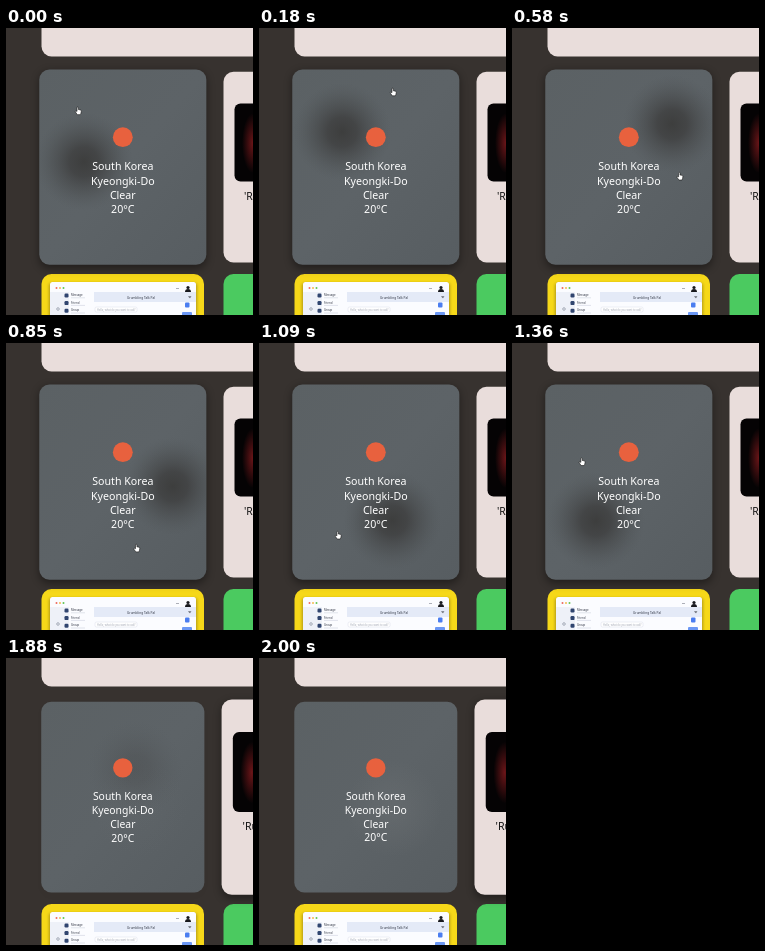
Recreate the animation shown at these times as an HTML page. Size 247 px wide and 287 px high, loop 2.03 s.

```html
<!DOCTYPE html>
<html lang="en">
<head>
<meta charset="utf-8">
<title>Weather card</title>
<style>
html, body { margin: 0; width: 100%; height: 100%; overflow: hidden; background: #37322f; }
svg { display: block; width: 247px; height: 287px; font-family: "Noto Sans", "Open Sans", sans-serif; }
</style>
</head>
<body>
<svg viewBox="0 0 247 287">
  <defs>
    <linearGradient id="slate" x2="1" y2="1">
      <stop stop-color="#5b6164"/><stop offset=".5" stop-color="#5d6367"/><stop offset="1" stop-color="#575d61"/>
    </linearGradient>
    <radialGradient id="shade">
      <stop stop-color="#393938" stop-opacity=".88"/>
      <stop offset=".3" stop-color="#3b3b3b" stop-opacity=".74"/>
      <stop offset=".65" stop-color="#434546" stop-opacity=".36"/>
      <stop offset="1" stop-color="#505558" stop-opacity="0"/>
    </radialGradient>
    <radialGradient id="glow">
      <stop stop-color="#777b7d" stop-opacity=".3"/><stop offset="1" stop-color="#777b7d" stop-opacity="0"/>
    </radialGradient>
    <radialGradient id="ember">
      <stop stop-color="#6b1518"/><stop offset="1" stop-color="#6b1518" stop-opacity="0"/>
    </radialGradient>
    <filter id="soft" x="-20%" y="-20%" width="140%" height="140%"><feGaussianBlur stdDeviation="4"/></filter>
    <filter id="blur"><feGaussianBlur stdDeviation="1.5"/></filter>
    <clipPath id="face"><rect x="-81.5" y="-95.3" width="163" height="190.6" rx="10"/></clipPath>
  </defs>

  <rect width="247" height="287" fill="#37322f"/>
  <rect x="35.5" y="-30" width="260" height="58.5" rx="10" fill="#e9dddb"/>
  <rect x="217.5" y="246" width="163" height="190" rx="10" fill="#4bca60"/>

  <rect x="35.5" y="246" width="162.5" height="190" rx="10" fill="#f6d819"/>
  <rect x="43" y="255" width="148" height="60" rx="3" fill="#8a7615" opacity=".65" filter="url(#blur)"/>
  <rect x="44" y="254" width="146" height="60" rx="2.5" fill="#fbfcff"/>
  <rect x="44" y="264" width="19" height="40" fill="#eef1f8"/>
  <rect x="88" y="264" width="102" height="10" fill="#e4eaf7"/>
  <circle cx="50.5" cy="260" r="1" fill="#ed6a5e"/>
  <circle cx="54" cy="260" r="1" fill="#f4be4f"/>
  <circle cx="57.5" cy="260" r="1" fill="#61c554"/>
  <circle cx="182" cy="259.5" r="1.6" fill="#18191d"/>
  <path d="M179 264q0-3 3-3t3 3z" fill="#18191d"/>
  <path d="M170 260.5h3M182.5 268.5h2.5l-1.2 1.6z" stroke="#777c88" stroke-width=".6" fill="#555"/>
  <g id="contacts"></g>
  <circle cx="52" cy="281" r="1.3" fill="none" stroke="#7a8190" stroke-width=".6"/>
  <text x="121" y="270.5" font-size="3.2" fill="#333846">Grumbling Talk Pal</text>
  <rect x="179" y="274.5" width="4.5" height="5" rx="1" fill="#4a7df0"/>
  <rect x="89" y="279" width="42" height="5" rx="1.5" fill="#fff" stroke="#d9dde8" stroke-width=".5"/>
  <text x="91" y="282.6" font-size="2.6" fill="#a3a8b5">Hello, what do you want to ask?</text>
  <rect x="176" y="284" width="10" height="4" rx="1" fill="#6b97f4"/>

  <g id="next">
    <rect class="halo" x="-81.5" y="-93" width="163" height="192" rx="10" fill="#000" filter="url(#soft)"/>
    <rect x="-81.5" y="-95.3" width="163" height="190.6" rx="10" fill="#e9dddb"/>
    <rect x="-70.5" y="-63.5" width="141" height="78" rx="6" fill="#050304"/>
    <ellipse cx="-52" cy="-24" rx="11" ry="30" fill="url(#ember)"/>
    <text x="-61" y="32.5" font-size="10.4" fill="#111">'Rust</text>
  </g>

  <g id="card">
    <rect class="halo" x="-81.5" y="-93" width="163" height="192" rx="10" fill="#000" filter="url(#soft)"/>
    <rect x="-81.5" y="-95.3" width="163" height="190.6" rx="10" fill="url(#slate)"/>
    <g clip-path="url(#face)">
      <circle id="light" cx="18" cy="12" r="48" fill="url(#glow)"/>
      <circle id="blob" r="48" fill="url(#shade)"/>
    </g>
    <circle cy="-29.2" r="9.7" fill="#e8613e"/>
    <g font-size="10.4" fill="#fff" text-anchor="middle">
      <text y="3.3">South Korea</text>
      <text y="17">Kyeongki-Do</text>
      <text y="30.7">Clear</text>
      <text y="44.4">20°C</text>
    </g>
  </g>

  <path id="hand" fill="#fff" stroke="#151515" stroke-width=".6" stroke-linejoin="round"
    d="M-1.3 .6V-3q0-.9.7-.9t.7.9v1.7l2 .4q1 .3.9 1.3l-.4 2.1-.6 1.3H-1L-2.8 1.2q-.5-.8.1-1 .5-.2 1.4.4z"/>
  <path id="arrow" fill="#151515" stroke="#fff" stroke-width=".6" stroke-linejoin="round"
    d="M-2-3.5V3L-.6 1.7.4 4 1.4 3.6.4 1.4H2.4z"/>
</svg>
<script>
const LOOP = 2030, LEAVE = 1690, ENTER = 1730;
const $ = id => document.getElementById(id);

// Waypoints: time, x, y
const pointer = [
  [0, 72, 83], [90, 100, 69], [180, 134, 64], [330, 166, 82], [460, 175, 115],
  [580, 168, 148], [720, 155, 182], [850, 131, 205], [1000, 97, 206], [1120, 75, 186],
  [1250, 66, 151], [1360, 70, 119], [1480, 97, 93], [1590, 147, 84], [1700, 205, 88], [1770, 255, 95]
];
const trail = [
  [0, 78, 134], [180, 83, 104], [400, 120, 90], [580, 160, 96], [850, 167, 143],
  [1100, 132, 178], [1360, 84, 178], [1550, 85, 135], [1700, 117, 108], [2030, 137, 116]
];

const clamp = v => Math.min(1, Math.max(0, v));
const ease = v => 1 - (1 - clamp(v)) ** 3;

// Smooth curve through timed waypoints
function along(path, t) {
  let i = 0;
  while (i < path.length - 2 && t >= path[i + 1][0]) i++;
  const b = path[i], c = path[i + 1];
  const a = path[i - 1] || b, d = path[i + 2] || c;
  const span = c[0] - b[0], u = clamp((t - b[0]) / span);
  return [1, 2].map(k => {
    const m = (c[k] - a[k]) / (c[0] - a[0]) * span;
    const n = (d[k] - b[k]) / (d[0] - b[0]) * span;
    return (2 * u ** 3 - 3 * u * u + 1) * b[k] + (u ** 3 - 2 * u * u + u) * m
      + (3 * u * u - 2 * u ** 3) * c[k] + (u ** 3 - u * u) * n;
  });
}

function lift(id, x, y, amount) {
  $(id).setAttribute("transform", `translate(${x} ${y}) scale(${1 + 0.025 * amount})`);
  $(id).querySelector(".halo").setAttribute("opacity", 0.4 * amount);
}

$("contacts").innerHTML = ["Message", "Friend", "Group"].map((name, i) => {
  const y = 267.5 + i * 7.6;
  return `<rect x="58.5" y="${y - 2}" width="4" height="4" rx="1.2" fill="#30456f"/>
    <text x="65" y="${y + .6}" font-size="2.8" fill="#333846">${name}</text>
    <path d="M65 ${y + 2.3}h14" stroke="#cdd2de" stroke-width=".6"/>`;
}).join("");

function draw(now) {
  const t = now % LOOP;
  const hover = 1 - ease((t - LEAVE - 10) / 270);
  lift("card", 116.8, 139.1, hover);
  lift("next", 299, 139.1, ease((t - ENTER) / 250));

  const [bx, by] = along(trail, t);
  $("blob").setAttribute("transform", `translate(${(bx - 116.8) / 1.025} ${(by - 139.1) / 1.025})`);
  $("blob").setAttribute("opacity", 1 - clamp((t - LEAVE) / 270));
  $("light").setAttribute("opacity", clamp((t - 1850) / 120));

  const [x, y] = along(pointer, t), inside = x < 201;
  for (const id of ["hand", "arrow"]) {
    $(id).setAttribute("transform", `translate(${x} ${y})`);
    $(id).setAttribute("visibility", (id === "hand") === inside ? "visible" : "hidden");
  }
}

const start = performance.now();
function tick() {
  draw(performance.now() - start);
  requestAnimationFrame(tick);
}
tick();
</script>
</body>
</html>
```
